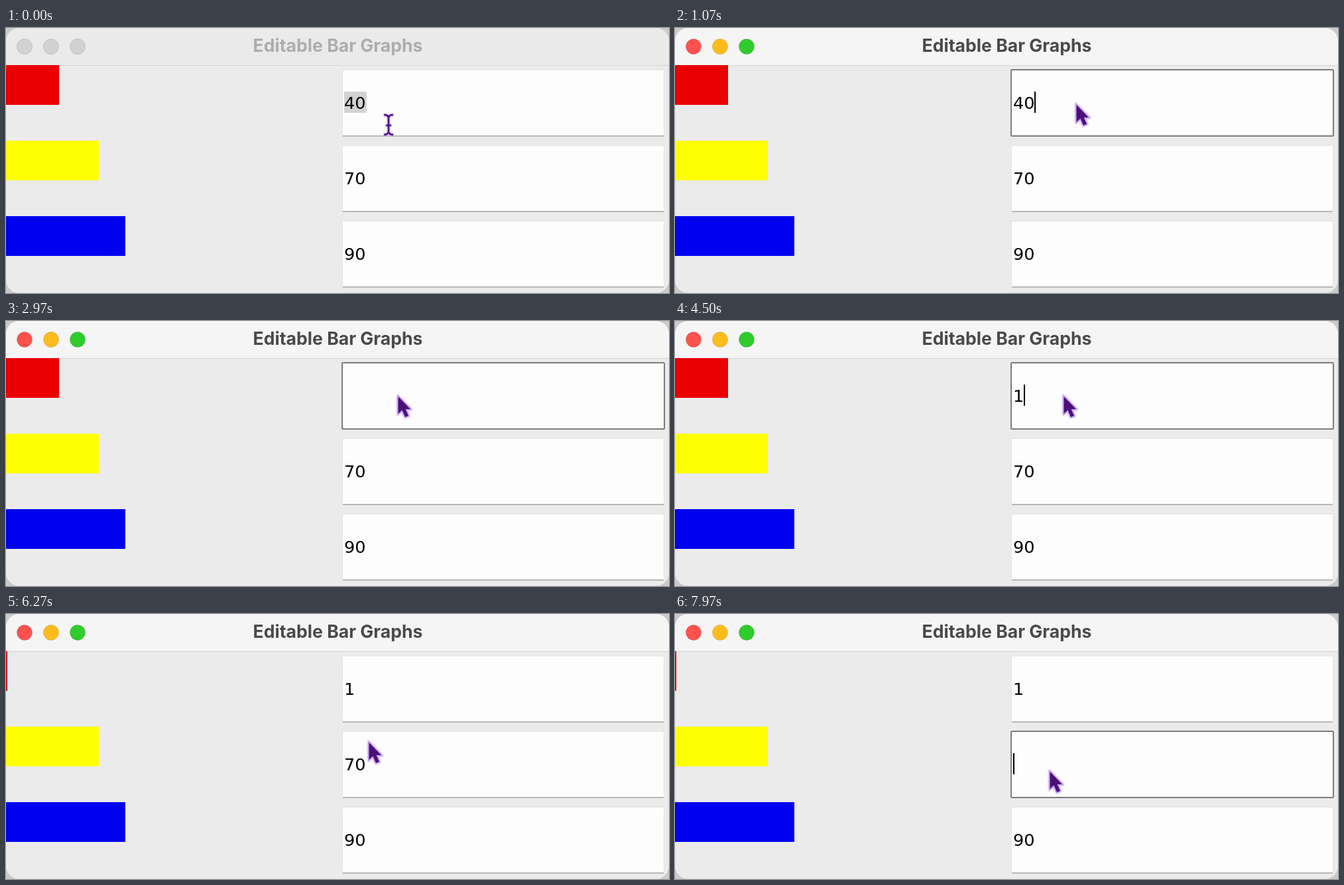
An HTML page that plays this animation: 1000 px wide and 400 px high, repeating every 8000 ms.

```html
<!DOCTYPE html>
<html lang="en">
<head>
<meta charset="utf-8">
<title>Editable Bar Graphs</title>
<style>
html, body { margin: 0; width: 100%; height: 100%; overflow: hidden; background: #cacaca; }
svg { display: block; width: 100vw; height: 100vh; }
.title { font: 700 26.6px Inter, sans-serif; text-anchor: middle; }
.value { font: 25.6px "DejaVu Sans", sans-serif; }
.pointer { filter: drop-shadow(0 0 1px #c8a4f4) drop-shadow(0 0 1px #c8a4f4); }
</style>
</head>
<body>
<svg viewBox="0 0 1000 400">
  <defs><clipPath id="win"><rect width="1000" height="400" rx="20"/></clipPath></defs>
  <g clip-path="url(#win)">
    <rect width="1000" height="400" fill="#ebebeb"/>
    <rect id="head" width="1000" height="56"/>
    <rect y="56" width="1000" height="1" fill="#d4d4d4"/>
    <g id="lights"></g>
    <text id="title" class="title" x="500.5" y="36">Editable Bar Graphs</text>
    <g id="rows"></g>
  </g>
  <rect id="caret" width="2" height="32"/>
  <path id="beam" class="pointer" d="M-7 0Q-1 0 0 4Q1 0 7 0M0 4V26M-7 30Q-1 30 0 26Q1 30 7 30M-4 16H4"
    fill="none" stroke="#4c1484" stroke-width="2.6"/>
  <path id="arrow" class="pointer" d="M1.5 3V29L7.5 23.5L12 34L17 32L12.5 22H20Z"
    fill="#4a1078" stroke="#c8a4f0" stroke-width="2.5" paint-order="stroke"/>
</svg>
<script>
const LOOP = 8000, PITCH = 114, DIGIT = 16, BLINK = 515;
const ACTIVATE = 1030, SUBMIT = 5330, SECOND = 6570;
const $ = id => document.getElementById(id);

function set(el, attrs) {
  for (const k in attrs) el.setAttribute(k, attrs[k]);
}
function add(parent, tag, attrs) {
  const el = document.createElementNS("http://www.w3.org/2000/svg", tag);
  set(el, attrs);
  return parent.appendChild(el);
}
const show = (el, on) => set(el, { visibility: on ? "visible" : "hidden" });

const lights = ["#ff524e", "#febc1c", "#30cc2c"].map((fill, i) =>
  ({ fill, el: add($("lights"), "circle", { cx: 28 + 40 * i, cy: 28, r: 11.5, stroke: "#000", "stroke-opacity": .13 }) }));

const rows = ["#ea0000", "#ffff04", "#0000f0"].map((fill, i) => {
  const g = add($("rows"), "g", { transform: `translate(0 ${PITCH * i})` });
  const bar = add(g, "rect", { y: 56, height: 60, fill });
  add(g, "rect", { x: 507.5, y: 63.5, width: 485, height: 99, fill: "#fdfdfd", stroke: "#e4e4e4" });
  add(g, "rect", { x: 508, y: 162, width: 484, height: 2, fill: "#b8b8b8" });
  const ring = add(g, "rect", { x: 507, y: 63, width: 486, height: 100, rx: 1.5, fill: "none", stroke: "#7c7c7c", "stroke-width": 2 });
  const mark = add(g, "rect", { x: 510, y: 96, width: 34, height: 32, fill: "#d3d3d3" });
  const text = add(g, "text", { x: 510, y: 122, class: "value" });
  return { bar, ring, mark, text };
});

// Pointer moves: start and end time, end point, sideways bend
const moves = [
  { from: 0, to: 430, x: 628, y: 116 },
  { from: 570, to: 800, x: 604, y: 113 },
  { from: 1070, to: 1270, x: 590, y: 111 },
  { from: 3970, to: 4100, x: 585, y: 111 },
  { from: 5840, to: 6560, x: 564, y: 235, bend: -28 },
];
const edits = [
  { at: 1730, row: 0, text: "4" },
  { at: 2430, row: 0, text: "" },
  { at: 4500, row: 0, text: "1" },
  { at: 7300, row: 1, text: "7" },
  { at: 7630, row: 1, text: "" },
];
const blinkStarts = [1190, 2430, SECOND];

function pointer(t) {
  let x = 577, y = 131;
  for (const m of moves) {
    const k = Math.min(1, Math.max(0, (t - m.from) / (m.to - m.from)));
    const e = k * k * (3 - 2 * k);
    x += (m.x - x) * e + (m.bend || 0) * Math.sin(Math.PI * e);
    y += (m.y - y) * e;
  }
  return `translate(${Math.round(x)} ${Math.round(y)})`;
}

function caretLit(t) {
  const start = blinkStarts.findLast(s => s <= t) ?? t;
  return Math.floor((t - start) / BLINK) % 2 === 0;
}

function draw(t) {
  const active = t >= ACTIVATE;
  const focus = t >= SECOND ? 1 : active && t < SUBMIT ? 0 : -1;
  const texts = ["40", "70", "90"];
  for (const e of edits) if (t >= e.at) texts[e.row] = e.text;

  set($("head"), { fill: active ? "#f5f5f5" : "#eaeaea" });
  set($("title"), { fill: active ? "#4a4a4a" : "#adadad" });
  for (const { el, fill } of lights) set(el, { fill: active ? fill : "#d2d2d4" });

  rows.forEach(({ bar, ring, mark, text }, i) => {
    set(bar, { width: 2 * [t < SUBMIT ? 40 : 1, 70, 90][i] });
    text.textContent = texts[i];
    show(ring, i === focus);
    show(mark, i === 0 && !active);
  });

  show($("caret"), focus >= 0 && caretLit(t));
  if (focus >= 0) set($("caret"), { x: 510 + DIGIT * texts[focus].length, y: 96 + PITCH * focus });

  const editing = t < 200;
  show($("beam"), editing);
  show($("arrow"), !editing);
  set(editing ? $("beam") : $("arrow"), { transform: pointer(t) });
}

const begin = performance.now();
function tick() {
  draw((performance.now() - begin) % LOOP);
  requestAnimationFrame(tick);
}
tick();
</script>
</body>
</html>
```
